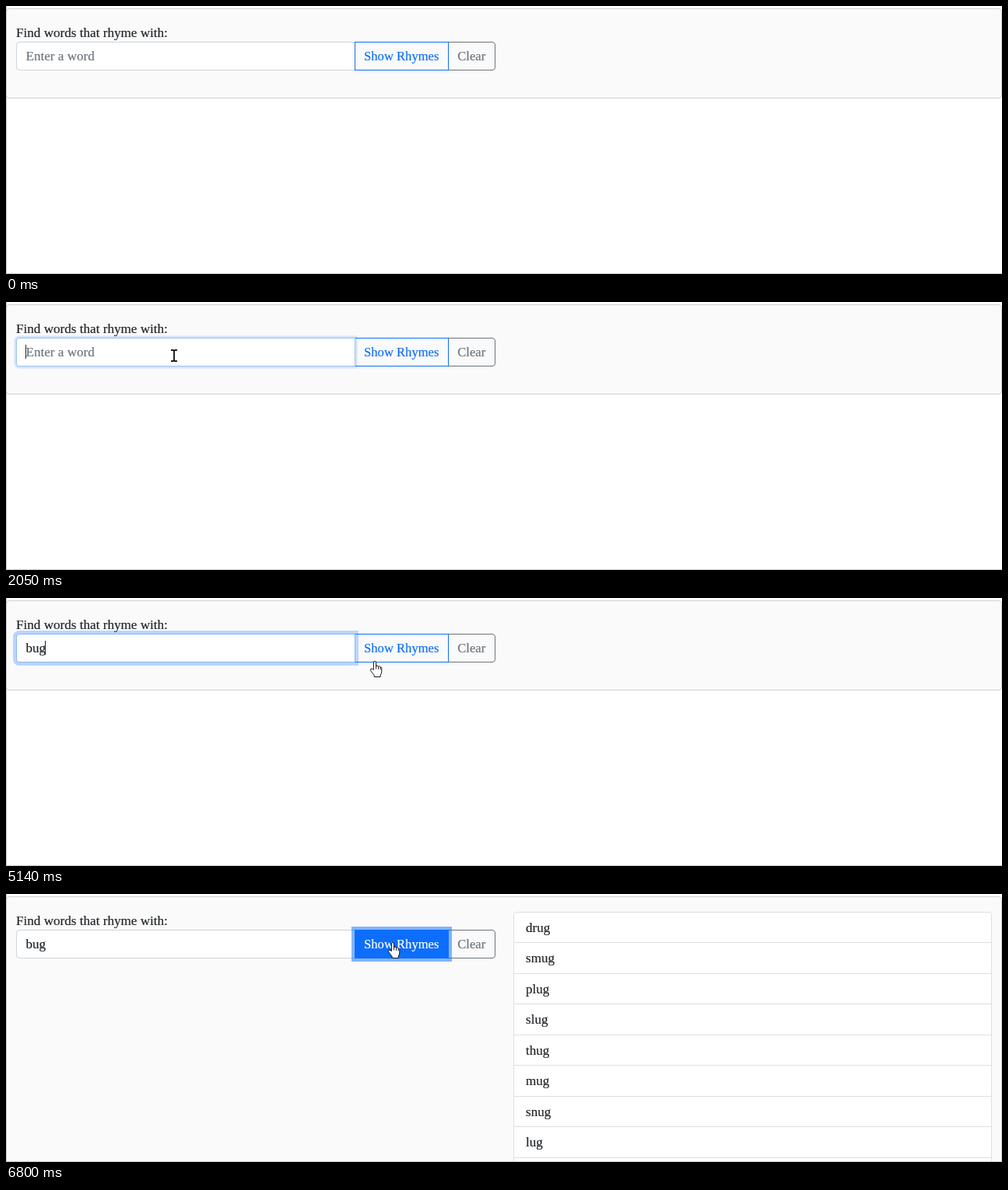
These frames come from a looping animation (1280 by 345 pixels, 8 s). An HTML page:

```html
<!DOCTYPE html>
<html lang="en">
<head>
<meta charset="utf-8">
<title>Rhyme finder</title>
<style>
* { box-sizing: border-box; }
html, body { margin: 0; width: 100%; height: 100%; overflow: hidden; background: #fff; }
body { font: 17.12px/24px "Liberation Serif", "Times New Roman", serif; color: #212529; }
#stage { position: absolute; left: 0; top: 0; width: 1280px; height: 345px; overflow: hidden; -webkit-text-stroke: .2px; }
#stage > * { position: absolute; white-space: pre; }
#edge { inset: 0; border: solid #c8c8c8; border-width: 0 0 1px 1px; }
#panel { left: 0; top: 3px; width: 1280px; height: 115.5px; background: #fafafa; border: 1px solid #d2d2d2; border-radius: 4px; }
#label { left: 13px; top: 22.5px; }
#field, .btn { top: 46px; height: 37px; line-height: 35px; border: 1px solid; }
#field { left: 12.5px; width: 436px; padding-left: 12px; background: #fff; border-radius: 4px 0 0 4px; }
.btn { font-size: 16.6px; text-align: center; }
#clear { left: 568px; width: 60.5px; color: #6c757d; border-radius: 0 4px 4px 0; }
#show { left: 447.5px; width: 121.5px; border-color: #0d6efd; }
#caret { top: 55px; width: 1px; height: 18px; background: #212529; }
#list { left: 652px; top: 23px; width: 615px; height: 360px; background: #fff; border: 1px solid #dfdfdf; border-radius: 4px; }
#list div { height: 39.45px; padding-left: 15px; line-height: 39px; border-bottom: 1px solid #dfdfdf; }
#cursor { left: 0; top: 0; width: 1280px; height: 345px; stroke: #000; fill: #fff; stroke-linejoin: round; }
</style>
</head>
<body>
<div id="stage">
  <div id="panel"></div>
  <div id="label">Find words that rhyme with:</div>
  <div id="clear" class="btn">Clear</div>
  <div id="field"></div>
  <div id="show" class="btn">Show Rhymes</div>
  <div id="caret"></div>
  <div id="list"></div>
  <div id="edge"></div>
  <svg id="cursor" viewBox="0 0 1280 345">
    <path id="arrow" d="M.5 .7V15.6L4 12.3L6.4 17.5L8.8 16.4L6.5 11.4H11.2Z"/>
    <g id="beam" fill="none" stroke-width="1.7">
      <path d="M-4-7.2H-1.2L0-6.2L1.2-7.2H4M0-6.4V6.4M-4 7.2H-1.2L0 6.2L1.2 7.2H4"/>
    </g>
    <path id="hand" d="M-1.6 11.5V2Q-1.6 .5 0 .5T1.6 2V7Q1.8 5.9 3 6T4.5 7.4Q4.9 6.6 5.9 6.8T7.1 8.2Q8.8 7.6 8.8 9.6V14Q8.8 16.3 7.2 18V20.5H-.8V18.5L-5.2 12.8Q-6.3 11.2-5.1 10.3Q-4 9.7-2.9 10.7Z M1.6 7V10.5M4.5 7.4V10.8M7.1 8.2V11.2" stroke-width=".9"/>
  </svg>
</div>
<script>
const LOOP = 8000;
const $ = id => document.getElementById(id);
const start = performance.now();

// [time, value] steps
const typed = [[0, ""], [3210, "b"], [3810, "bu"], [4070, "bug"]];
const caretOn = [[0, 0], [1860, 1], [2450, 0], [2980, 1], [3540, 0], [3810, 1], [4600, 0], [5130, 1], [5670, 0]];
const fieldFocus = [[0, 0], [1980, .25], [2050, .62], [2120, 1], [6130, .85], [6200, .5], [6270, .2], [6330, .05], [6400, 0]];
const showFocus = [[0, 0], [6130, .15], [6200, .5], [6270, .8], [6330, .95], [6400, 1]];
const hover = [[0, 0], [5210, .45], [5270, .85], [5340, 1]];
const pointer = [[0, ["none", 0, 0]]];

for (let i = 0; i < 12; i++) {
  const p = 1 - (1 - i / 11) ** 2;
  pointer.push([460 + i * 70, ["arrow", 1067 - 849 * p, 333 - 247 * p]]);
}
for (let i = 1; i <= 6; i++) {
  const y = 86 - 17 * i / 6;
  pointer.push([1290 + i * 70, [y > 83 ? "arrow" : "beam", 218 - i / 3, y]]);
}
pointer.push(
  [4860, ["beam", 226, 70]], [4930, ["beam", 272, 76]],
  [5000, ["arrow", 352, 84]], [5070, ["arrow", 432, 86]],
  [5140, ["hand", 474, 81]], [5210, ["hand", 488, 72]],
  [5270, ["hand", 495, 65]], [5340, ["hand", 497, 62]]
);

for (const word of ["drug", "smug", "plug", "slug", "thug", "mug", "snug", "lug", ""]) {
  const row = document.createElement("div");
  row.textContent = word;
  $("list").append(row);
}

const at = (steps, t) => steps.reduce((v, s) => s[0] <= t ? s[1] : v, steps[0][1]);
const mix = (a, b, k) => `rgb(${a.map((v, i) => Math.round(v + (b[i] - v) * k))})`;
const glow = (k, alpha) => k ? `0 0 0 ${4 * k}px rgba(13,110,253,${alpha * k})` : "none";
const blue = [13, 110, 253], white = [255, 255, 255], pale = [250, 250, 250];

function draw(t) {
  const text = at(typed, t), focus = at(fieldFocus, t), press = at(showFocus, t), over = at(hover, t);
  const field = $("field").style, show = $("show").style;

  $("field").textContent = text || "Enter a word";
  field.color = text ? "#212529" : "#6c757d";
  field.borderColor = mix([206, 212, 218], [134, 183, 254], focus);
  field.boxShadow = glow(focus, .27);
  field.zIndex = focus ? 2 : 0;

  show.background = over ? mix(pale, blue, over) : "transparent";
  show.color = mix(blue, white, over);
  show.boxShadow = glow(press, .5);
  show.zIndex = press ? 3 : 1;

  $("caret").style.cssText = `z-index:4;left:${Math.floor(25.4 + text.length * 8.5)}px;opacity:${at(caretOn, t)}`;

  const done = t >= 6800;
  $("list").style.display = done ? "block" : "none";
  $("panel").style.height = done ? "400px" : "115.5px";
  $("edge").style.zIndex = 4;

  const [kind, x, y] = at(pointer, t);
  $("cursor").style.zIndex = 5;
  for (const id of ["arrow", "beam", "hand"]) {
    $(id).style.display = id === kind ? "" : "none";
    $(id).setAttribute("transform", `translate(${Math.round(x)} ${Math.round(y)})`);
  }
}

function tick() {
  draw((performance.now() - start) % LOOP);
  requestAnimationFrame(tick);
}
tick();
</script>
</body>
</html>
```
